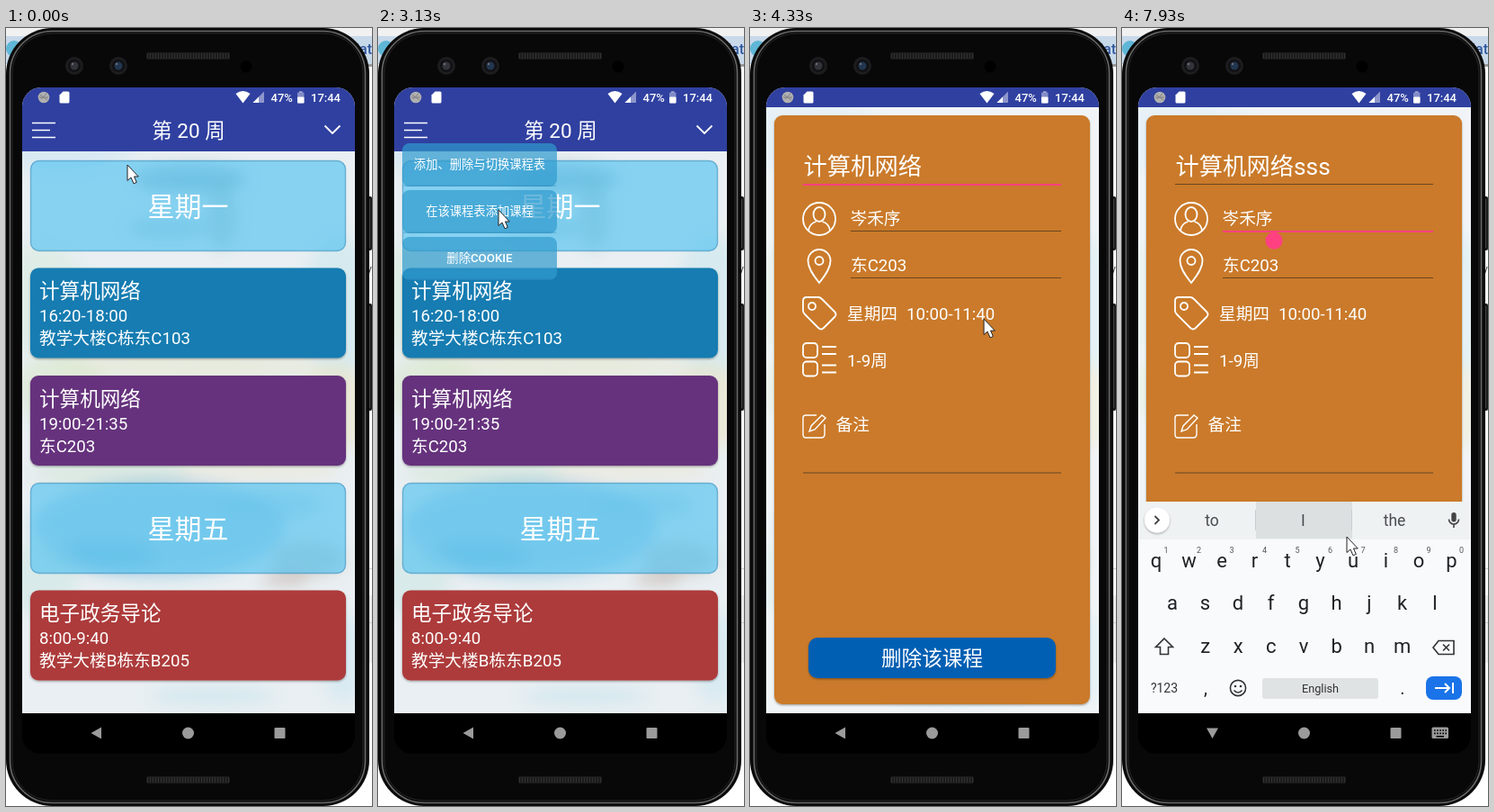
Write an HTML page that moves like this. It is 407x864 px and loops after 8 s.

```html
<!DOCTYPE html>
<html lang="zh-CN">
<head>
<meta charset="utf-8">
<title>课程表</title>
<style>
html, body { margin: 0; width: 100%; height: 100%; overflow: hidden; background: #fff; }
svg { display: block; width: 407px; height: 864px; }
text { font-family: Roboto, "Noto Sans CJK SC", "Noto Sans CJK", sans-serif; white-space: pre; }
</style>
</head>
<body>
<svg id="stage" viewBox="0 0 407 864" xmlns="http://www.w3.org/2000/svg"></svg>
<script>
const LOOP = 8000, TICK = 1000 / 15;
const PINK = '#ff4081';

const rect = (x, y, w, h, fill, rx = 0, more = '') =>
  `<rect x="${x}" y="${y}" width="${w}" height="${h}" rx="${rx}" fill="${fill}" ${more}/>`;
const circle = (x, y, r, fill, more = '') =>
  `<circle cx="${x}" cy="${y}" r="${r}" fill="${fill}" ${more}/>`;
const line = (d, color = '#fff', w = 1.8, more = '') =>
  `<path d="${d}" fill="none" stroke="${color}" stroke-width="${w}" ${more}/>`;
const shape = (d, fill, more = '') => `<path d="${d}" fill="${fill}" ${more}/>`;
const text = (x, y, s, size, fill = '#fff', more = '') =>
  `<text x="${x}" y="${y}" font-size="${size}" fill="${fill}" ${more}>${s}</text>`;
const mid = (x, y, s, size, fill, more = '') =>
  text(x, y, s, size, fill, 'text-anchor="middle" ' + more);
const group = (id, body, more = '') => `<g id="${id}" ${more}>${body}</g>`;

// soft scenery behind the app
const blobs = [
  [60, 120, 90, 40, '#cfe6f4', .6], [205, 168, 62, 15, '#5f93ab', .45],
  [240, 208, 17, 38, '#8fb0a8', .4], [180, 222, 45, 12, '#7fb3c4', .35],
  [40, 300, 50, 60, '#d9ecdf', .6], [370, 310, 40, 80, '#cfe8ee', .7],
  [200, 375, 150, 16, '#e4e4c4', .45], [60, 400, 50, 40, '#d8e8c8', .5],
  [365, 420, 40, 50, '#ece2be', .5], [120, 495, 90, 16, '#cfe4d2', .5],
  [280, 490, 90, 16, '#ece4cc', .4], [170, 555, 140, 55, '#4fa9d4', .36],
  [110, 585, 60, 18, '#3f94c0', .25], [290, 530, 60, 16, '#8cc6dc', .4],
  [335, 590, 40, 20, '#b3a794', .35], [40, 610, 40, 40, '#c9e6e2', .5],
  [310, 612, 26, 9, '#a88d80', .3], [230, 742, 70, 10, '#bfe3ee', .5],
  [375, 700, 24, 50, '#cfe8f2', .6]
];
const scenery = rect(18, 66, 370, 695, '#e9eff2') + '<g filter="url(#soft)">' +
  blobs.map(([x, y, a, b, c, o]) =>
    `<ellipse cx="${x}" cy="${y}" rx="${a}" ry="${b}" fill="${c}" opacity="${o}"/>`).join('') + '</g>';
const navBack = rect(18, 761, 370, 45, '#000');

const desktop = rect(0, 0, 407, 864, '#fff') + rect(0, 0, 407, 9, '#f1f1f1') +
  rect(0, 9, 407, 31, '#c8d9ea') + circle(9, 23, 9, '#5fb6d6') +
  text(389, 29, 'iat', 16, '#31589c', 'font-weight="500"') +
  rect(400, 40, 7, 3, '#9a9a9a') + text(401, 272, 'v', 12, '#333') +
  rect(402, 600, 5, 1, '#ccc') + rect(402, 630, 5, 75, '#e9e9e9') +
  rect(402, 660, 5, 1, '#ccc') + rect(160, 861, 62, 3, '#7fb8c9');

const lens = (x, c) => circle(x, 42, 10, '#1d1d20') + circle(x, 42, 7, '#111114') +
  circle(x, 42, 4.5, c) + circle(x - 2, 40, 1.3, '#666b75');
const grille = y => rect(156, y, 93, 8, '#1b1b1b', 2) +
  line(`M157 ${y + 4}H248`, '#303030', 6, 'stroke-dasharray="1 2"');
const phone = rect(401, 187, 6, 60, '#1b1b1b', 2) + rect(401, 306, 6, 119, '#1b1b1b', 2) +
  line('M404.5 190V244M404.5 309V422', '#444', 1) +
  rect(0, 0, 404, 864, '#0a0a0a', 51) +
  rect(4.5, 3.5, 395, 857, 'none', 47, 'stroke="#6a6a6a" stroke-width="1.6"') +
  rect(7, 6, 390, 852, '#080808', 44, 'stroke="#262626"') +
  grille(27) + grille(831) + lens(76, '#33343a') + lens(125, '#22364f') + circle(267, 43, 6.5, '#000');

const dayCard = (y, name) =>
  rect(27.5, y, 350, 100, 'rgba(84,194,240,.66)', 9, 'stroke="rgba(52,140,190,.6)" stroke-width="1.4"') +
  mid(202.5, y + 61.5, name, 30, '#fff');
const courseCard = (y, color, name, time, room) =>
  rect(27, y + .5, 351, 100, color, 9, 'filter="url(#drop)"') +
  text(37, y + 34, name, 22.6) + text(37, y + 60, time, 18.7) + text(37, y + 85, room, 18.7);

const listWin = rect(18, 66, 370, 740, '#000') + scenery +
  rect(18, 66, 370, 71, '#2f40a0') +
  line('M29 105.5H55M29 113.500H49M29 121.500H55', '#fff', 1.6) + line('M354.5 108.5L363 117L371.5 108.5') +
  mid(203, 122, '第 20 周', 22.5, '#fff') +
  dayCard(147.5, '星期一') +
  courseCard(266, '#147cb1', '计算机网络', '16:20-18:00', '教学大楼C栋东C103') +
  courseCard(385.5, '#66327d', '计算机网络', '19:00-21:35', '东C203') +
  dayCard(505.5, '星期五') +
  courseCard(624, '#ad3a3b', '电子政务导论', '8:00-9:40', '教学大楼B栋东B205') + navBack;

const menu = ['添加、删除与切换课程表', '在该课程表添加课程', '删除COOKIE'].map((s, i) =>
  rect(27, 128 + 52 * i, 172, 48, 'rgba(48,155,205,.7)', 8) +
  rect(27.5, 174.5 + 52 * i, 171, 1.5, 'rgba(30,110,160,.25)', 1) +
  mid(113, 156 + 52 * i, s, 13.3, '#fff', 'font-weight="500"')).join('');

const icons = circle(77, 212, 18, 'none', 'stroke="#fff" stroke-width="1.8"') +
  `<ellipse cx="77" cy="207" rx="6.5" ry="8" fill="none" stroke="#fff" stroke-width="1.8"/>` +
  line('M65 225C66 218 70 216 73.500 215M80.500 215C84 216 88 218 89 225') +
  line('M77 283C69 273 64.500 266 64.500 258.500A12.500 12.500 0 0 1 89.500 258.500C89.500 266 85 273 77 283Z') +
  circle(77, 258.5, 4.5, 'none', 'stroke="#fff" stroke-width="1.8"') +
  line('M59 303Q59 299 63 299L76 299Q78 299 80 301L94 315Q97 318 94 321L82 333Q79 336 76 333L61 318Q59 316 59 314Z') +
  circle(69, 309, 4, 'none', 'stroke="#fff" stroke-width="1.8"') +
  [350, 370.5].map(y => rect(59, y, 16, 16, 'none', 4, 'stroke="#fff" stroke-width="1.8"') +
    line(`M80 ${y + 4}H96M80 ${y + 12}H96`)).join('') +
  line('M74 430H62Q59 430 59 433V451Q59 455 62 455H79Q83 455 83 451V440M66 448L68 442L80 430L84 433L72 446Z', '#fff', 1.4);

const rule = (id, x, y) => `<rect id="${id}" x="${x}" width="${346 - x}" y="${y}" height="1"/>`;
const formWin = rect(18, 66, 370, 740, '#000') + scenery +
  rect(18, 88, 370, 673, 'rgba(255,255,255,.35)') + rect(18, 66, 370, 22, '#2f40a0') +
  rect(27, 97, 351, 654, '#ca7a2b', 9, 'filter="url(#drop)"') +
  text(59.5, 163, '计算机网络', 26.3, '#fff', 'id="name"') +
  rule('rule1', 59, 173) + rule('rule2', 112, 225) +
  rect(112, 277, 234, 1, '#6b4522') + rect(59, 493.5, 287, 1, '#6b4522') + icons +
  text(111.5, 218, '岑禾序', 18.7) + text(112, 270, '东C203', 18.7) +
  text(108, 324, '星期四', 18.7) + text(174, 324, '10:00-11:40', 18.7) +
  text(108, 376, '1-9周', 18.7) + text(95.5, 447, '备注', 18.7) +
  rect(65, 677, 275, 45, '#005fb3', 10, 'filter="url(#drop)"') +
  mid(202.5, 708, '删除该课程', 22.6, '#fff') +
  rect(0, 0, 1.8, 37, PINK, 0, 'id="caret"') +
  shape('M0 0L6.700 4.500A9.500 9.500 0 1 1 -6.700 4.500Z', PINK, 'id="handle"') + navBack;

const keyRow = (s, x, y) => [...s].map((c, i) => mid(x + 36.5 * i, y, c, 22, '#202124')).join('');
const board = rect(18, 526, 370, 235, '#f9fafc') + rect(18, 526, 370, 42, '#eff2f3') +
  rect(149, 526, 107, 41, '#dce0e1', 0, 'id="pick"') +
  circle(39, 546.5, 14, '#fff', 'filter="url(#drop)"') + line('M36.500 542L41 546.500L36.500 551', '#444') +
  line('M148.500 535V558M255.500 535V558', '#c9cdcf', 1) +
  ['to', 'I', 'the'].map((s, i) => mid(100 + 101.5 * i, 553, s, 17.5, '#4a4d50')).join('') +
  rect(366.3, 538, 5.4, 10.5, '#444', 2.7) + line('M363.500 545.500A5.500 5.500 0 0 0 374.500 545.500M369 551V555', '#444', 1.6) +
  keyRow('qwertyuiop', 38, 599) + keyRow('asdfghjkl', 56, 646) + keyRow('zxcvbnm', 92.7, 694) +
  [...'1234567890'].map((c, i) => mid(49 + 36.5 * i, 583, c, 9, '#555')).join('') +
  line('M47 678L56.500 687.500H51.500V695.500H42.500V687.500H37.500Z', '#333', 1.6) +
  line('M346 688L352 680.500H369V695.500H352ZM357 684.500L364 691.500M364 684.500L357 691.500', '#333', 1.6) +
  mid(47, 738, '?123', 14, '#333') + mid(93, 740, ',', 20, '#222') + mid(312, 740, '.', 20, '#222') +
  circle(129, 733, 8.6, 'none', 'stroke="#333" stroke-width="1.6"') +
  circle(126, 731, 1.3, '#333') + circle(132, 731, 1.3, '#333') + line('M124.500 735.500Q129 740.500 133.500 735.500', '#333', 1.5) +
  rect(156, 722, 129, 23, '#dfe3e3', 3) + mid(220.5, 738, 'English', 12.7, '#333') +
  rect(338, 720, 40, 26, '#1a73e8', 8) + line('M348 733H364M359 728L364 733L359 738M368 727V739', '#fff', 2);

const status = circle(42, 77, 6.3, '#b0b0b0') + line('M38 74L46 80M39 79L45 73M37 77H47', '#808080', 1) +
  shape('M63.500 70.500H69Q70.500 70.500 70.500 72V82Q70.500 83.500 69 83.500H61Q59.500 83.500 59.500 82V74.500Z', '#fff') +
  shape('M255.500 73Q263.500 67 271.500 73L263.500 83.500Z', '#fff') +
  shape('M287 70.500V83H274.500Z', '#fff', 'opacity=".45"') + shape('M281 76.500V83H274.500Z', '#fff') +
  text(294.5, 82, '47%', 13, '#fff', 'font-weight="500"') +
  rect(324, 71.5, 7.5, 12, '#fff', 1, 'opacity=".4"') + rect(326, 70, 3.5, 2, '#fff', 0, 'opacity=".4"') +
  rect(324, 76.5, 7.5, 7, '#fff', 1) +
  text(339, 82, '17:44', 13, '#fff', 'font-weight="500"');

const GREY = '#9b9b9b';
const nav = shape('M94.500 783L106 776.500V789.500Z', GREY, 'id="back"') +
  shape('M94 777.500H107L100.500 789Z', GREY, 'id="down"') +
  circle(202.5, 783, 6.5, GREY) + rect(298.5, 777, 12, 12, GREY, 1) +
  group('swap', rect(344.5, 776.5, 18.5, 12.5, GREY, 1.5) +
    line('M347 780H361M347 783.300H361', '#000', 1.7, 'stroke-dasharray="1.700 1.400"') + line('M349.500 786.700H358', '#000', 1.5));

const stage = document.getElementById('stage');
stage.innerHTML = `<defs>
  <filter id="soft" x="-20%" y="-20%" width="140%" height="140%"><feGaussianBlur stdDeviation="8"/></filter>
  <filter id="drop" x="-10%" y="-10%" width="120%" height="125%"><feDropShadow dx="0" dy="1.2" stdDeviation="1.2" flood-opacity=".35"/></filter>
  <clipPath id="glass"><rect x="18" y="66" width="370" height="740" rx="21"/></clipPath>
  <clipPath id="pane"><rect x="18" y="66" width="370" height="740"/></clipPath></defs>` +
  desktop + phone +
  group('screen', rect(18, 66, 370, 740, '#000') +
    group('list', `<g clip-path="url(#pane)">${listWin}</g>`) + group('menu', menu) +
    group('form', `<g clip-path="url(#pane)">${formWin}</g>`) +
    group('board', board) + status + nav, 'clip-path="url(#glass)"') +
  shape('M0 0V17.500L4 14L7 20.800L10.300 19.400L7.500 13H12.300Z', '#fff',
    'id="mouse" stroke="#222" stroke-width="1" stroke-linejoin="round"');

const el = {};
stage.querySelectorAll('[id]').forEach(n => el[n.id] = n);
const clamp = v => Math.max(0, Math.min(1, v));
const span = (t, a, b) => clamp((t - a) / (b - a));
const smooth = p => p * p * (3 - 2 * p);
const out = (p, n) => 1 - (1 - p) ** n;
const show = (n, on) => n.setAttribute('visibility', on ? 'visible' : 'hidden');
const move = (n, x, y, more = '') => n.setAttribute('transform', `translate(${x} ${y})${more}`);
const fade = (n, v) => n.setAttribute('opacity', v);

// pointer stops: time, x, y
const path = [
  [0, 135, 152], [200, 122, 158], [600, 30, 107], [1400, 30, 107], [1930, 84, 172],
  [2066, 78, 198], [2270, 100, 225], [2530, 134, 202], [3870, 134, 202],
  [4320, 260, 323], [4470, 263, 328], [4800, 315, 230], [5130, 300, 150], [5270, 300, 150],
  [5600, 220, 498], [6060, 97, 640], [6680, 97, 640], [7066, 220, 220], [7133, 224, 229],
  [7330, 224, 229], [7930, 250, 565], [8000, 250, 565]
];
function pointer(t) {
  const i = Math.max(1, path.findIndex(k => k[0] >= t));
  const [a, x, y] = path[i - 1], [b, u, v] = path[i];
  const p = smooth(span(t, a, b));
  return [x + (u - x) * p, y + (v - y) * p];
}

const EXIT = 3410, ENTER = 3710, TAP1 = 5265, TAP2 = 7265;
const keys = [6265, 6465, 6665];

function render(t) {
  move(el.mouse, ...pointer(t));

  const open = span(t, 1265, 2070), shut = span(t, 3140, 3340);
  show(el.menu, open > 0 && shut < 1);
  move(el.menu, 0, 60 * (1 - out(open, 2)) + 60 * shut * shut);
  fade(el.menu, span(t, 1230, 1530) * (1 - shut));

  const e = out(span(t, EXIT, EXIT + 433), 3), s = 1 - .1 * e;
  move(el.list, 203 * (1 - s), 436 * (1 - s) + 20 * e, ` scale(${s})`);
  fade(el.list, 1 - .43 * e);
  show(el.list, t < 4260);
  show(el.form, t > ENTER);
  move(el.form, 0, 814 * (1 - out(span(t, ENTER, ENTER + 500), 5)));

  const typed = keys.filter(k => t >= k).length;
  el.name.textContent = '计算机网络' + 's'.repeat(typed);
  const second = t >= TAP2;
  [[el.rule1, !second, 173], [el.rule2, second, 225]].forEach(([n, on, y]) => {
    n.setAttribute('fill', on ? PINK : '#6b4522');
    n.setAttribute('height', on ? 2 : 1);
    n.setAttribute('y', y);
  });

  const reset = [4490, TAP1, ...keys, TAP2].filter(k => t >= k).pop();
  const lit = reset !== undefined && (t - reset) % 1000 < 500;
  const cx = second ? 168.5 : t < TAP1 ? 59.5 : 192.5 + 13.6 * typed;
  show(el.caret, lit && t > ENTER);
  el.caret.setAttribute('height', second ? 26 : 37);
  move(el.caret, cx - .9, second ? 199 : 136);
  show(el.handle, second || (t >= TAP1 && !typed));
  move(el.handle, second ? 169 : 193, second ? 225 : 173);

  const ime = t > 5460;
  show(el.board, ime);
  move(el.board, 0, 30 * (1 - smooth(span(t, 5510, 5960))));
  fade(el.board, span(t, 5455, 5655));
  show(el.pick, t > 7860);
  show(el.back, !ime);
  show(el.down, ime);
  show(el.swap, ime);
}

const start = performance.now();
function loop() {
  const t = (performance.now() - start) % LOOP;
  render(Math.floor((t + 4) / TICK) % 120 * TICK);
  requestAnimationFrame(loop);
}
loop();
</script>
</body>
</html>
```
